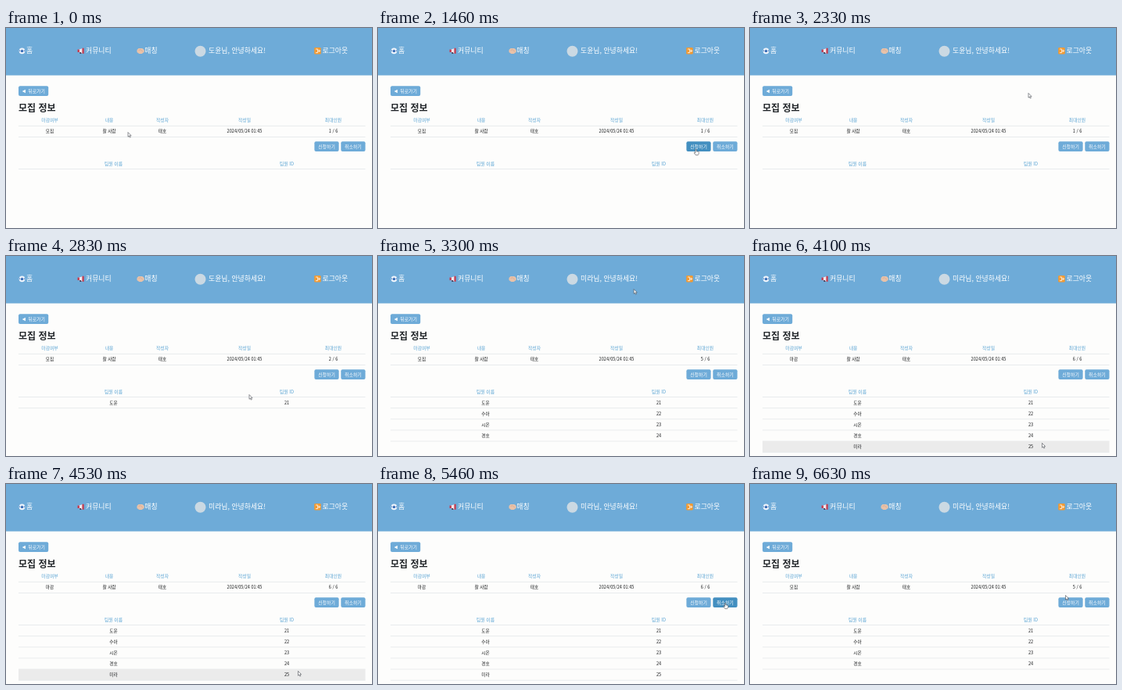
Recreate the animation shown at these times as an HTML page. Size 468 px wide and 256 px high, loop 6660 ms.

```html
<!DOCTYPE html>
<html lang="ko">
<head>
<meta charset="utf-8">
<title>모집 정보</title>
<style>
  html, body { margin: 0; width: 100%; height: 100%; overflow: hidden; background: #fdfdfc; }
  svg { display: block; width: 100vw; height: 100vh; }
  text { font-family: "Noto Sans CJK KR", "Noto Sans CJK", "Noto Sans CJK JP", sans-serif; font-size: 5.6px; fill: #17191b; }
  .mid { text-anchor: middle; }
  .nav { font-size: 8.9px; fill: #fff; }
  .head { font-size: 5.8px; fill: #57a2d3; }
  .label { font-size: 5.9px; fill: #fff; }
  .title { font-size: 12px; font-weight: 700; fill: #212529; }
</style>
</head>
<body>
<svg viewBox="0 0 468 256">
  <rect width="468" height="60.6" fill="#6eabd8"/>
  <g id="ball">
    <circle cx="20.5" cy="29.4" r="3.8" fill="#edf3fb"/>
    <path d="M20.5 27.5l2 1.4-.8 2.2h-2.4l-.8-2.2zM17 28l1 1-1 1.5zM24 28l-1 1 1 1.5z" fill="#3c6fb8"/>
  </g>
  <g id="megaphone">
    <path d="M92 28l6-2v6.4l-6-1.6z" fill="#f3e9ee"/>
    <path d="M91.5 27.6h2.4v3.5h-2.4zM97.4 25.7h2.3v7h-2.3z" fill="#c23c50"/>
    <path d="M94 31h2l.5 2h-2z" fill="#493d57"/>
  </g>
  <g id="handshake">
    <path d="M167.5 28l2-2h4.8l2.4 2v2.8l-3 2.1h-3.3l-2.9-2z" fill="#e8c2a9"/>
    <path d="M169.6 28.6l2.3-1 3 2.6" fill="none" stroke="#cda28c" stroke-width=".6"/>
  </g>
  <circle cx="248.5" cy="29.8" r="7" fill="#cbd9e3"/>
  <g id="exit">
    <rect x="394.2" y="24.9" width="8.5" height="8.5" rx="1.2" fill="#f39a32"/>
    <path d="M396 27h2.7v4.6H396M398.5 29.3h3M400.2 27.9l1.5 1.4-1.5 1.4" fill="none" stroke="#fff" stroke-width=".8"/>
  </g>
  <g id="page"></g>
  <g id="cursor" stroke="#44484e" stroke-width=".7" stroke-linejoin="round" fill="#fff">
    <path id="arrow" d="M0 0v6.8l1.6-1.4 1.1 2.4 1.2-.6-1.1-2.3h2z"/>
    <path id="hand" d="M-.7.6Q0-.4.8.6V3.2l3 .7q.8.3.7 1.2L4 7.7 3.2 9H-.3L-2.7 5.8q-.3-1 .7-.9l1.3 1z"/>
  </g>
</svg>
<script>
const LOOP = 6660, MOVE = 520;
const LEFT = 16, WIDTH = 443.5, ROW_TOP = 180.6, ROW_H = 14.1;
const BLUE = '#6eabd8', BLUE_HOVER = '#438fc0';
const names = ['도윤', '수아', '시온', '경호', '미라'];
const $ = id => document.getElementById(id);
const page = $('page');

function add(parent, tag, attrs, content = '') {
  const node = document.createElementNS('http://www.w3.org/2000/svg', tag);
  for (const key in attrs) node.setAttribute(key, attrs[key]);
  node.textContent = content;
  return parent.appendChild(node);
}
const write = (content, x, y, cls, parent = page) => add(parent, 'text', { x, y, class: cls }, content);
const rule = (y, parent = page) =>
  add(parent, 'rect', { x: LEFT, y: y - .3, width: WIDTH, height: .7, fill: '#e0e4e7' });

function button(label, x, y, width, indent = 0) {
  const box = { x, y, width, height: 12.8 };
  const rect = add(page, 'rect', { ...box, rx: 2, fill: BLUE });
  write(label, x + width / 2 + indent, y + 8.5, 'label mid');
  return { ...box, rect };
}

const nav = (label, x) => write(label, x, 32.1, 'nav');
nav('홈', 26);
nav('커뮤니티', 102);
nav('매칭', 177.3);
nav('로그아웃', 404.5);
const greeting = nav('', 259);
write('모집 정보', LEFT, 106.8, 'title');

const [status, , , , count] = [
  ['마감여부', '', 56], ['내용', '찰 사람', 132], ['작성자', '태호', 200],
  ['작성일', '2024/05/24 01:45', 305], ['최대인원', '', 418.5]
].map(([head, value, x]) => {
  write(head, x, 120.2, 'head mid');
  return write(value, x, 134.4, 'mid');
});
write('팀원 이름', 137.5, 175.5, 'head mid');
write('팀원 ID', 359, 175.5, 'head mid');
[125.2, 139.6, ROW_TOP].forEach(y => rule(y));

const rows = names.map((name, i) => {
  const group = add(page, 'g', {});
  const box = { x: LEFT, y: ROW_TOP + i * ROW_H, width: WIDTH, height: ROW_H };
  const shade = add(group, 'rect', { ...box, fill: '#ebebeb' });
  write(name, 137.5, box.y + 9, 'mid', group);
  write(21 + i, 359, box.y + 9, 'mid', group);
  rule(box.y + ROW_H, group);
  return { ...box, group, shade };
});

const buttons = [
  button('뒤로가기', LEFT, 74.3, 38.2, 4),
  button('신청하기', 394.4, 145.2, 31.2),
  button('취소하기', 428.3, 145.2, 31.2)
];
add(page, 'path', { d: 'M20.7 81l4.2-2.3v4.6z', fill: '#fff' });

const spots = {
  start: [156, 133.5], apply: [406.5, 155], cancel: [444, 152], top: [300, 4],
  table: [311, 177.5], fourth: [362, 227], fifth: [373.5, 239.5], end: [403.5, 142.5]
};
// Arrival times; the pointer rests between moves
const route = [
  [0, 'start'], [1000, 'apply'], [2600, 'top'], [2830, 'table'], [3100, 'apply'], [3400, 'top'],
  [3660, 'fourth'], [4100, 'fifth'], [5300, 'cancel'], [6100, 'top'], [6630, 'end']
];
// Time and number of members
const joins = [[0, 0], [2790, 1], [3040, 4], [3535, 5], [6400, 4]];

function pointerAt(t) {
  const next = route.findIndex(([time]) => time > t);
  if (next < 0) return spots.end;
  const [left, from] = route[next - 1], [arrive, to] = route[next];
  const leave = Math.max(left, arrive - MOVE);
  const u = Math.max(0, (t - leave) / (arrive - leave));
  const ease = u * u * (3 - 2 * u);
  return spots[from].map((v, i) => v + (spots[to][i] - v) * ease);
}
const inside = (box, x, y) =>
  x >= box.x && x < box.x + box.width && y >= box.y && y < box.y + box.height;
const show = (node, on) => { node.style.display = on ? '' : 'none'; };

function render(t) {
  const members = joins.filter(([time]) => time <= t).pop()[1];
  const [x, y] = pointerAt(t);
  greeting.textContent = `${names[members > 1 ? 4 : 0]}님, 안녕하세요!`;
  status.textContent = members === 5 ? '마감' : '모집';
  count.textContent = `${members + 1} / 6`;
  rows.forEach((row, i) => {
    show(row.group, i < members);
    show(row.shade, inside(row, x, y));
  });
  buttons.forEach(b => b.rect.setAttribute('fill', inside(b, x, y) ? BLUE_HOVER : BLUE));
  const overButton = buttons.some(b => inside(b, x, y));
  show($('hand'), overButton);
  show($('arrow'), !overButton);
  $('cursor').setAttribute('transform', `translate(${x} ${y}) scale(.85)`);
}

const start = performance.now();
function frame() {
  render((performance.now() - start) % LOOP);
  requestAnimationFrame(frame);
}
frame();
</script>
</body>
</html>
```
